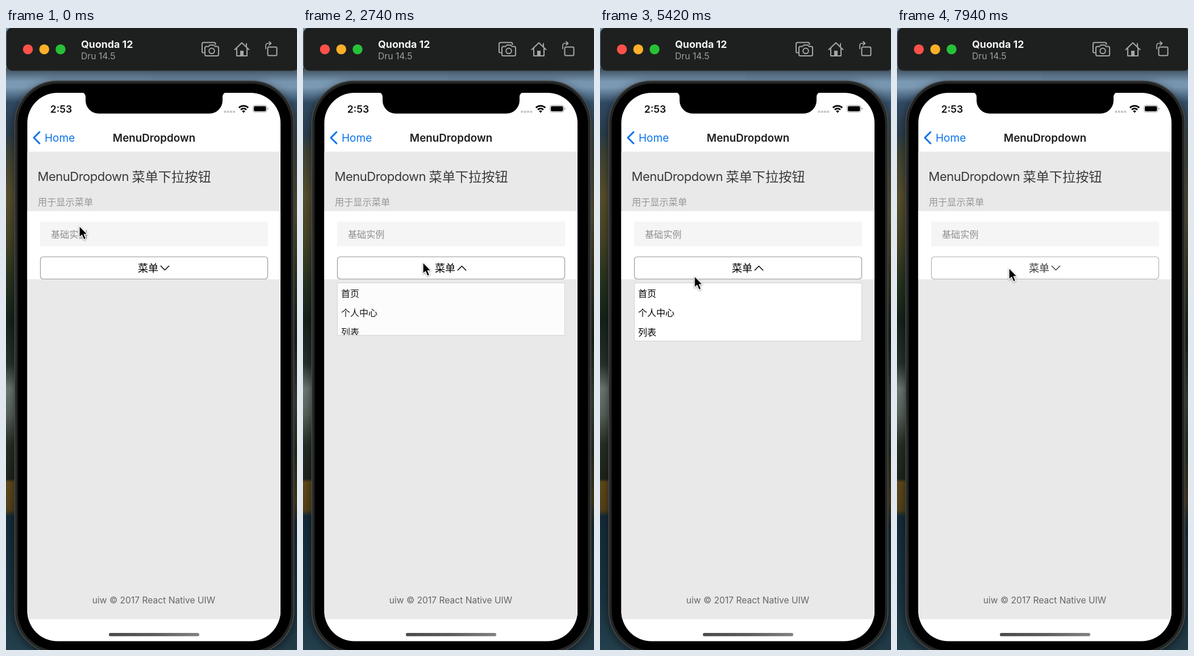
Write an HTML page that moves like this. It is 512 px wide and 1094 px high and loops after 8000 ms.

```html
<!DOCTYPE html>
<html lang="zh-CN">
<head>
<meta charset="utf-8">
<title>MenuDropdown</title>
<style>
  html, body { margin: 0; width: 100%; height: 100%; overflow: hidden; background: #1f2c30; }
  svg { position: absolute; left: 0; top: 0; width: 512px; height: 1094px; }
  text, #menu { font-family: Inter, "Noto Sans CJK SC", "Noto Sans CJK", sans-serif; }
  .cjk, #menu { font-family: "Noto Sans CJK SC", "Noto Sans CJK", sans-serif; }
  .line { fill: none; stroke-linecap: round; stroke-linejoin: round; }
  #menu {
    position: absolute; left: 60px; top: 448px; width: 401px; height: 102.5px;
    box-sizing: border-box; overflow: hidden; padding-left: 6px;
    background: #fff; border: 1px solid #d3d3d3; color: #000;
    font-size: 16px; line-height: 34.2px;
  }
</style>
</head>
<body>
<svg viewBox="0 0 512 1094">
  <defs>
    <linearGradient id="landL" x2="0" y2="1">
      <stop offset=".07" stop-color="#7595b0"/><stop offset=".095" stop-color="#7c9ab4"/>
      <stop offset=".12" stop-color="#304a63"/><stop offset=".17" stop-color="#2b3e4d"/>
      <stop offset=".2" stop-color="#3f4436"/><stop offset=".27" stop-color="#58502f"/>
      <stop offset=".34" stop-color="#474528"/><stop offset=".41" stop-color="#26331f"/>
      <stop offset=".47" stop-color="#15221a"/><stop offset=".54" stop-color="#26322c"/>
      <stop offset=".58" stop-color="#6c7873"/><stop offset=".62" stop-color="#59645c"/>
      <stop offset=".67" stop-color="#252f24"/><stop offset=".725" stop-color="#1d241c"/>
      <stop offset=".73" stop-color="#5f4a1c"/><stop offset=".775" stop-color="#54421b"/>
      <stop offset=".785" stop-color="#142b39"/><stop offset=".9" stop-color="#19323f"/>
      <stop offset="1" stop-color="#24404d"/>
    </linearGradient>
    <linearGradient id="landR" x2="0" y2="1">
      <stop offset=".07" stop-color="#7392ad"/><stop offset=".095" stop-color="#7896b0"/>
      <stop offset=".12" stop-color="#34506a"/><stop offset=".19" stop-color="#3c4640"/>
      <stop offset=".3" stop-color="#5b5230"/><stop offset=".4" stop-color="#36391f"/>
      <stop offset=".5" stop-color="#19231b"/><stop offset=".6" stop-color="#3b453d"/>
      <stop offset=".68" stop-color="#28301f"/><stop offset=".76" stop-color="#4a3c1b"/>
      <stop offset=".8" stop-color="#172c38"/><stop offset="1" stop-color="#223c48"/>
    </linearGradient>
    <linearGradient id="shade" x2="0" y2="1">
      <stop stop-color="#000" stop-opacity=".5"/><stop offset="1" stop-color="#000" stop-opacity="0"/>
    </linearGradient>
    <linearGradient id="homeBar">
      <stop stop-color="#4a4a4a"/><stop offset=".5" stop-color="#5c5c5c"/><stop offset="1" stop-color="#828282"/>
    </linearGradient>
    <clipPath id="screen"><rect x="37.5" y="114" width="445.5" height="964.5" rx="53"/></clipPath>
  </defs>

  <rect width="256" height="1094" fill="url(#landL)"/>
  <rect x="256" width="256" height="1094" fill="url(#landR)"/>
  <rect y="70" width="512" height="24" fill="url(#shade)"/>

  <!-- simulator toolbar -->
  <rect x="1" y="-.5" width="514" height="75.5" rx="10" fill="#1e201f" stroke="#343736"/>
  <circle cx="38.5" cy="37.5" r="8.7" fill="#ff5149"/>
  <circle cx="67.3" cy="37.5" r="8.7" fill="#fdb028"/>
  <circle cx="96" cy="37.5" r="8.7" fill="#27c138"/>
  <text x="132" y="34.5" font-size="17.8" font-weight="700" fill="#f4f5f4">Quonda 12</text>
  <text x="132" y="54.5" font-size="15.7" fill="#9b9e9c">Dru 14.5</text>
  <g class="line" stroke="#a4a7a5" stroke-width="2">
    <path d="M348 43.5h-1q-2-.2-2-2.5V28q0-2.5 2.5-2.5h18.5q2.5 0 2.5 2.5v1"/>
    <path d="M352.5 32.5h4l2-2.5h7l2 2.5h4q2.5 0 2.5 2.5v11.5q0 2.5-2.5 2.5h-19q-2.5 0-2.5-2.5V35q0-2.5 2.5-2.5z"/>
    <circle cx="362" cy="40.3" r="4.8"/>
    <path d="M402.5 38L415 26l12.5 12M406 36v13h18V36M423 32.5V27.5"/>
    <rect x="460.5" y="33.5" width="16" height="15" rx="2"/>
    <path d="M457 36.5V31q0-4 4-4h5M463 24l3.5 3-3.5 3" stroke-width="1.7"/>
  </g>
  <rect x="412" y="40" width="6" height="9" fill="#a4a7a5"/>

  <!-- phone body -->
  <rect x="15.5" y="93" width="491" height="1007" rx="75" fill="#242525" stroke="#4b4c4c" stroke-width="1.5"
        style="filter:drop-shadow(0 4px 8px #0008)"/>
  <rect x="20.5" y="98" width="481" height="997" rx="70"/>

  <g clip-path="url(#screen)">
    <rect x="37" y="114" width="447" height="965" fill="#fff"/>
    <rect x="37" y="217.5" width="447" height="822.2" fill="#e9e9e9"/>
    <rect x="37" y="322" width="447" height="120" fill="#fff"/>
    <path d="M132 113a8 8 0 0 1 8 8v6.500a23 23 0 0 0 23 23h195a23 23 0 0 0 23-23V121a8 8 0 0 1 8-8z"/>
  </g>

  <!-- status bar -->
  <text x="97" y="149" font-size="17.6" font-weight="600" text-anchor="middle" fill="#111">2:53</text>
  <path d="M383.5 147.3h20" stroke="#c3c3c5" stroke-width="3.6" stroke-dasharray="3.8 1.5"/>
  <path d="M409.8 140.2a12 12 0 0 1 16.4 0M413 143.7a7.300 7.300 0 0 1 10 0" fill="none" stroke="#000" stroke-width="2.7"/>
  <path d="M418 149.2l-2.8-2.9a4 4 0 0 1 5.600 0z"/>
  <rect x="434.5" y="136" width="24.5" height="12" rx="3.5" fill="none" stroke="#a0a0a0"/>
  <rect x="436" y="137.5" width="21.5" height="9" rx="2.2"/>
  <path d="M460.3 140v4q1.700-.5 1.700-2t-1.700-2z" fill="#a0a0a0"/>

  <!-- navigation and page -->
  <path class="line" d="M59 183L49 193l10 10" stroke="#0a73ea" stroke-width="3"/>
  <text x="68" y="200" font-size="19" fill="#0a73ea">Home</text>
  <text x="260.5" y="199.5" font-size="18.8" font-weight="600" text-anchor="middle" fill="#1c1c1e">MenuDropdown</text>
  <text x="55.5" y="269" font-size="22.1" letter-spacing="-.025em" fill="#3a3a3a">MenuDropdown</text>
  <text class="cjk" x="221.5" y="269.5" font-size="23.2" fill="#3a3a3a">菜单下拉按钮</text>
  <text class="cjk" x="56" y="311.5" font-size="16.2" fill="#969696">用于显示菜单</text>
  <rect x="60" y="340.5" width="401" height="43.5" fill="#f5f5f5"/>
  <text class="cjk" x="79" y="368.5" font-size="16.1" fill="#8e8e8e">基础实例</text>
  <text x="260" y="1011.5" font-size="15.6" text-anchor="middle" fill="#666">uiw © 2017 React Native UIW</text>
  <rect x="181" y="1064" width="159" height="5.700" rx="2.8" fill="url(#homeBar)"/>

  <g id="button">
    <rect x="60.5" y="402.5" width="400" height="39" rx="5" fill="#fff" stroke="#9a9a9a" stroke-width="1.2"/>
    <text class="cjk" x="232" y="429" font-size="18.1">菜单</text>
    <path id="down" class="line" d="M272.3 418.5l7.200 7.300 7.200-7.300" stroke="#000" stroke-width="1.5"/>
    <path id="up" class="line" d="M272.3 426l7.200-7.300 7.200 7.300" stroke="#000" stroke-width="1.5"/>
  </g>
</svg>

<div id="menu"><div>首页</div><div>个人中心</div><div>列表</div></div>

<svg viewBox="0 0 512 1094">
  <g id="cursor" style="filter:drop-shadow(0 1.5px 1.5px #0006)">
    <path d="M0 0v20.500l4.600-4.300 3.400 8 3.700-1.600-3.400-7.800h6z" stroke="#fff" stroke-width="1.3" stroke-linejoin="round"/>
  </g>
</svg>

<script>
  const LOOP = 8000, OPEN = 1840, CLOSE = 7800;

  // Each step: [time in ms, styles, easing towards the next step]
  function play(id, steps) {
    const frames = steps.map(([time, styles, easing = 'linear']) =>
      ({ offset: time / LOOP, easing, ...styles }));
    document.getElementById(id).animate(frames, { duration: LOOP, iterations: Infinity });
  }
  const at = (x, y) => ({ transform: `translate(${x}px, ${y}px)` });
  const fade = opacity => ({ opacity });
  const size = (height, opacity) => ({ height: height + 'px', opacity });

  play('cursor', [
    [0, at(129, 348)],
    [120, at(129, 348), 'ease-in-out'],
    [520, at(224, 396), 'ease-in-out'],
    [900, at(211, 412)],
    [3580, at(211, 412), 'ease-in-out'],
    [4120, at(139, 458)],
    [4640, at(139, 458), 'ease-in-out'],
    [4960, at(138, 461)],
    [5120, at(138, 461), 'ease-in-out'],
    [5820, at(212, 396)],
    [6800, at(212, 396), 'ease-in-out'],
    [7340, at(197, 422)],
    [LOOP, at(197, 422)]
  ]);

  play('button', [
    [0, fade(1)],
    [1760, fade(1)],
    [OPEN, fade(.3)],
    [1920, fade(.56)],
    [2080, fade(1)],
    [7440, fade(1), 'ease-in-out'],
    [7590, fade(.2)],
    [CLOSE, fade(.2)],
    [7940, fade(.75)],
    [LOOP, fade(.95)]
  ]);

  const toggle = (before, during) => [
    [0, fade(before), 'step-end'],
    [OPEN, fade(during), 'step-end'],
    [CLOSE, fade(before), 'step-end'],
    [LOOP, fade(before)]
  ];
  play('down', toggle(1, 0));
  play('up', toggle(0, 1));

  play('menu', [
    [0, size(0, 0), 'step-end'],
    [1880, size(0, 0), 'ease-in-out'],
    [2980, size(102.5, 1), 'step-end'],
    [CLOSE, size(0, 0), 'step-end'],
    [LOOP, size(0, 0)]
  ]);
</script>
</body>
</html>
```
